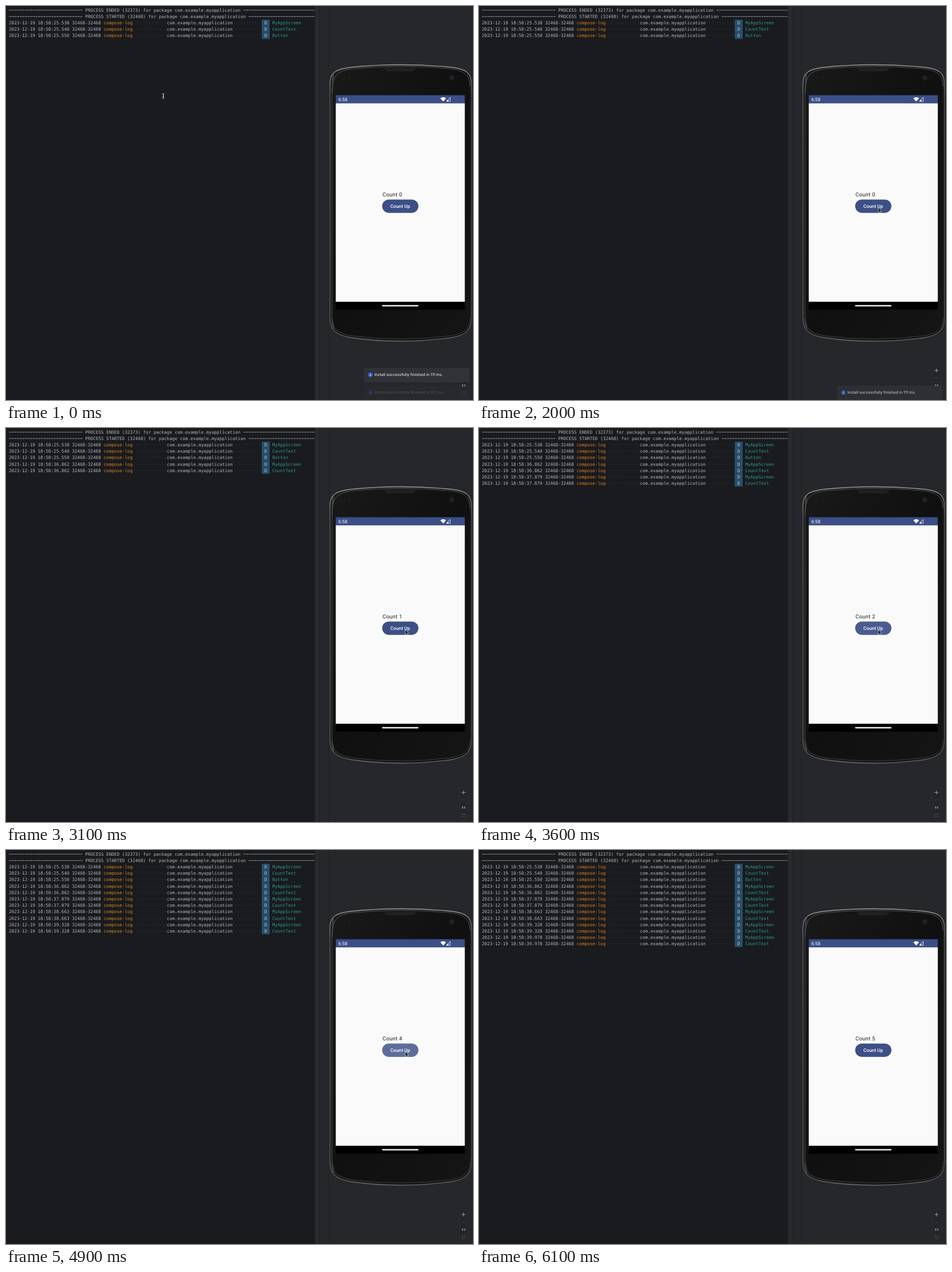
Write an HTML page that moves like this. It is 815 px wide and 687 px high and loops after 6.2 s.

```html
<!DOCTYPE html>
<html lang="en">
<head>
<meta charset="utf-8">
<title>Logcat and counter</title>
<style>
  html, body { margin: 0; width: 100%; height: 100%; overflow: hidden; background: #1a1b1e; }
  svg { display: block; width: 815px; height: 687px; }
  text { text-rendering: geometricPrecision; }
  .log { font: 7.636px "DejaVu Sans Mono", monospace; fill: #b4b6bb; }
  .tag { fill: #d9821f; }
  .msg { fill: #2a9a90; }
  .level { fill: #b9cbd8; }
  .dots { fill: #3b3d41; }
  .app { font-family: Roboto, sans-serif; }
  .note { font: 500 6.7px Inter, sans-serif; fill: #dfe1e5; }
</style>
</head>
<body>
<svg viewBox="0 0 815 687">
  <defs>
    <linearGradient id="rim" x1="0" x2="1" y1="0" y2="0">
      <stop offset="0" stop-color="#3c3d3e"/>
      <stop offset=".012" stop-color="#1c1c1d"/>
      <stop offset=".022" stop-color="#434445"/>
      <stop offset=".034" stop-color="#191919"/>
      <stop offset=".97" stop-color="#101010"/>
      <stop offset="1" stop-color="#1b1b1c"/>
    </linearGradient>
    <linearGradient id="face" x1="0" x2="1" y1="0" y2="1">
      <stop offset="0" stop-color="#191919"/>
      <stop offset=".5" stop-color="#101010"/>
      <stop offset="1" stop-color="#151515"/>
    </linearGradient>
    <linearGradient id="edge" x1="0" x2="0" y1="0" y2="1">
      <stop offset="0" stop-color="#a2a3a4"/>
      <stop offset=".05" stop-color="#77787a"/>
      <stop offset=".12" stop-color="#4b4c4e"/>
      <stop offset=".92" stop-color="#4b4c4e"/>
      <stop offset="1" stop-color="#6b6c6e"/>
    </linearGradient>
    <clipPath id="pill"><rect x="656.5" y="337.4" width="63.2" height="23.4" rx="11.7"/></clipPath>
    <clipPath id="pane"><rect width="539.5" height="687"/></clipPath>
  </defs>

  <rect width="815" height="687" fill="#1a1b1e"/>
  <g id="log" class="log" clip-path="url(#pane)"></g>

  <rect x="539.5" width="276" height="687" fill="#26272b"/>
  <rect x="539.5" width="7" height="687" fill="#292a2e"/>
  <path d="M547 0V687M562.5 0V687" stroke="#1f2023" stroke-width=".8"/>

  <!-- phone -->
  <path d="M565 137C565 116 576 110 601 107Q688 98 779 107C802 110 812.3 116 812.3 137V543C812.3 563 804 573 779 578Q688 591 600 578C574 573 565 563 565 543Z" fill="url(#rim)" stroke="url(#edge)" stroke-width="1.3"/>
  <path d="M570 148C570 120 575 115 603 110.5Q688 101.5 776 110.5C801 114 809 120 809 146V539C809 560 800 570 777 574.5Q688 586 603 574.5C578 570 570 560 570 539Z" fill="url(#face)"/>
  <path d="M569.5 152C569 121 577 114 603 109.5Q688 101 777 109.5C800 113 809 120 810 140" fill="none" stroke="#66686a" stroke-width=".8"/>
  <path d="M567 544C569 563 579 570 603 575Q688 586 777 575C801 570 809 562 810.5 543" fill="none" stroke="#48494b" stroke-width=".8"/>
  <path d="M659 107.7Q688 106.6 717 107.7L711 114H665Z" fill="#202021"/>
  <g fill="#1d1d1f">
    <circle cx="591" cy="125" r="2.3"/><circle cx="600" cy="125" r="2.3"/>
    <circle cx="778" cy="125" r="5"/>
  </g>
  <circle cx="778" cy="125" r="2.3" fill="#25262b"/>

  <!-- device screen -->
  <rect x="575.5" y="155.5" width="225.2" height="374" fill="#000"/>
  <rect x="575.5" y="155.5" width="225.2" height="14.3" fill="#3b4e87"/>
  <rect x="575.5" y="169.7" width="225.2" height="346" fill="#fafafa"/>
  <rect x="656.3" y="521.4" width="63.5" height="2.4" rx="1.2" fill="#fff"/>
  <g class="app">
    <text x="580" y="165.8" font-size="8.2" fill="#fff">6:58</text>
    <path d="M758 161Q763 156.8 768 161L763 166.6Z" fill="#fff"/>
    <path d="M768.7 166.2L775.2 159.4V166.2Z" fill="none" stroke="#fff" stroke-width=".8"/>
    <path d="M768.7 166.2L772 162.8V166.2Z" fill="#fff"/>
    <text id="count" x="657" y="332.4" font-size="9.375" letter-spacing=".29" fill="#1b1b1f"></text>
    <rect x="656.5" y="337.4" width="63.2" height="23.4" rx="11.7" fill="#3c4f86"/>
    <circle id="ripple" cx="697" cy="352" fill="#fff" clip-path="url(#pill)"/>
    <text x="688" y="352.4" font-size="8.2" font-weight="500" letter-spacing=".06" fill="#fff" text-anchor="middle">Count Up</text>
  </g>

  <!-- zoom bar -->
  <rect x="791.5" y="628" width="14" height="54.5" rx="1.5" fill="#242529" stroke="#303236" stroke-width=".8"/>
  <path d="M795 635.5H801.8M798.4 632.1V638.9" stroke="#b9bbc0" stroke-width=".8"/>
  <path d="M795 648.7H801.8" stroke="#4c4e53" stroke-width=".8"/>
  <text x="798.4" y="664" font-family="Inter, sans-serif" font-size="5.4" font-weight="700" fill="#ced0d6" text-anchor="middle">1:1</text>
  <path d="M795.4 672.5H801.4V678H795.4ZM797 676.5L799.8 674" fill="none" stroke="#4c4e53" stroke-width=".8"/>

  <g id="oldNote"></g>
  <g id="newNote"></g>

  <path id="beam" d="M-2.2 -4Q0 -4 0 -2.7Q0 -4 2.2 -4M0 -3V3M-2.2 4Q0 4 0 2.7Q0 4 2.2 4M-1.2 .7H1.2" fill="none" stroke="#d4d5d8" stroke-width="1"/>
  <path id="arrow" d="M0 0V8L1.8 6.4L3 9.2L4.4 8.6L3.2 5.9H5.6Z" fill="#000" stroke="#fff" stroke-width=".6"/>
</svg>
<script>
const LOOP = 6200, STEP = 100, CHAR = 4.597, ROW = 11.18;
const CLICKS = [2290, 3307, 4091, 4756, 5406];
const STAMPS = ["36.862", "37.879", "38.663", "39.328", "39.978"];
const $ = id => document.getElementById(id);
const col = n => 5 + n * CHAR;
const clamp = v => Math.min(1, Math.max(0, v));
const span = (t, a, b) => clamp((t - a) / (b - a));
const ease = p => p * p * (3 - 2 * p);
const mix = (a, b, p) => a + (b - a) * p;

const label = (n, y, str, cls = "") => `<text x="${col(n)}" y="${y}" class="${cls}">${str}</text>`;

function header(row, word, pid, end) {
  const y = 9.7 + row * ROW, mid = y - 2.5;
  const dash = (a, b) =>
    `<path d="M${col(a) + 0.4} ${mid}H${b}" stroke="#a5a7ac" stroke-width=".9" stroke-dasharray="3.8 ${CHAR - 3.8}"/>`;
  return dash(0, col(28)) + dash(end, 540) +
    label(29, y, `PROCESS ${word} (${pid}) for package com.example.myapplication`);
}

function entry(row, stamp, msg) {
  const y = 9.7 + row * ROW;
  return `<g><rect x="446.3" y="${y - 8.2}" width="13.8" height="${ROW + 0.1}" fill="#284f6c"/>` +
    label(0, y, `2023-12-19 18:58:${stamp} 32468-32468`) +
    label(36, y, "compose-log", "tag") +
    label(48, y, "·".repeat(12), "dots") +
    label(61 - 1, y, "com.example.myapplication") +
    label(86, y, "·".repeat(10), "dots") +
    label(97, y, "D", "level") + label(100, y, msg, "msg") + "</g>";
}

const entries = [["25.538", "MyAppScreen"], ["25.540", "CountText"], ["25.550", "Button"]];
for (const s of STAMPS) entries.push([s, "MyAppScreen"], [s, "CountText"]);
$("log").innerHTML = header(0, "ENDED", 32373, 89) + header(1, "STARTED", 32468, 91) +
  entries.map(([s, m], i) => entry(i + 2, s, m)).join("");
const rows = [...$("log").querySelectorAll("g")];

const note = ms => `<rect x="625" y="631" width="184" height="25.3" rx="2.5" fill="#303237"/>
  <circle cx="636" cy="643" r="3.8" fill="#3069dc"/>
  <path d="M636 642.4V645.4M636 640.4V641.4" stroke="#fff" stroke-width=".9"/>
  <text class="note" x="643" y="645.4">Install successfully finished in ${ms} ms.</text>`;
$("oldNote").innerHTML = note(107);
$("newNote").innerHTML = note(111);
$("oldNote").setAttribute("transform", "translate(0 31)");

// Pointer stops: time, x, y
const PATH = [[100, 274.5, 157], [750, 386, 558], [850, 386, 558], [1850, 697, 352],
  [5500, 697, 352], [5800, 670, 700]];

function pointer(t) {
  let i = 0;
  while (i < PATH.length - 2 && t > PATH[i + 1][0]) i++;
  const [a, b] = [PATH[i], PATH[i + 1]];
  const p = ease(span(t, a[0], b[0]));
  return [mix(a[1], b[1], p), mix(a[2], b[2], p)];
}

function draw(t) {
  const count = CLICKS.filter(c => t >= c).length;
  $("count").textContent = "Count " + count;
  rows.forEach((g, i) => g.setAttribute("visibility", i < 3 + count * 2 ? "visible" : "hidden"));

  const press = CLICKS.find(c => t >= c - 120 && t < c + 350);
  const since = press ? t - press : 999;
  $("ripple").setAttribute("r", mix(12, 46, ease(span(since, -120, 110))));
  $("ripple").setAttribute("opacity", 0.17 * span(since, -130, -50) * (1 - span(since, 215, 350)));

  $("oldNote").setAttribute("opacity", 0.2 * (1 - span(t, 0, 100)));
  $("newNote").setAttribute("transform", `translate(0 ${31 * ease(span(t, 100, 500))})`);
  $("newNote").setAttribute("opacity", 1 - span(t, 1900, 2400));

  const [x, y] = pointer(t), typing = x < 540;
  for (const [id, on] of [["beam", typing], ["arrow", !typing]]) {
    $(id).setAttribute("transform", `translate(${x} ${y})`);
    $(id).setAttribute("visibility", on ? "visible" : "hidden");
  }
}

function tick() {
  const t = performance.now() % LOOP;
  draw(Math.floor(t / STEP) * STEP);
  requestAnimationFrame(tick);
}
tick();
</script>
</body>
</html>
```
